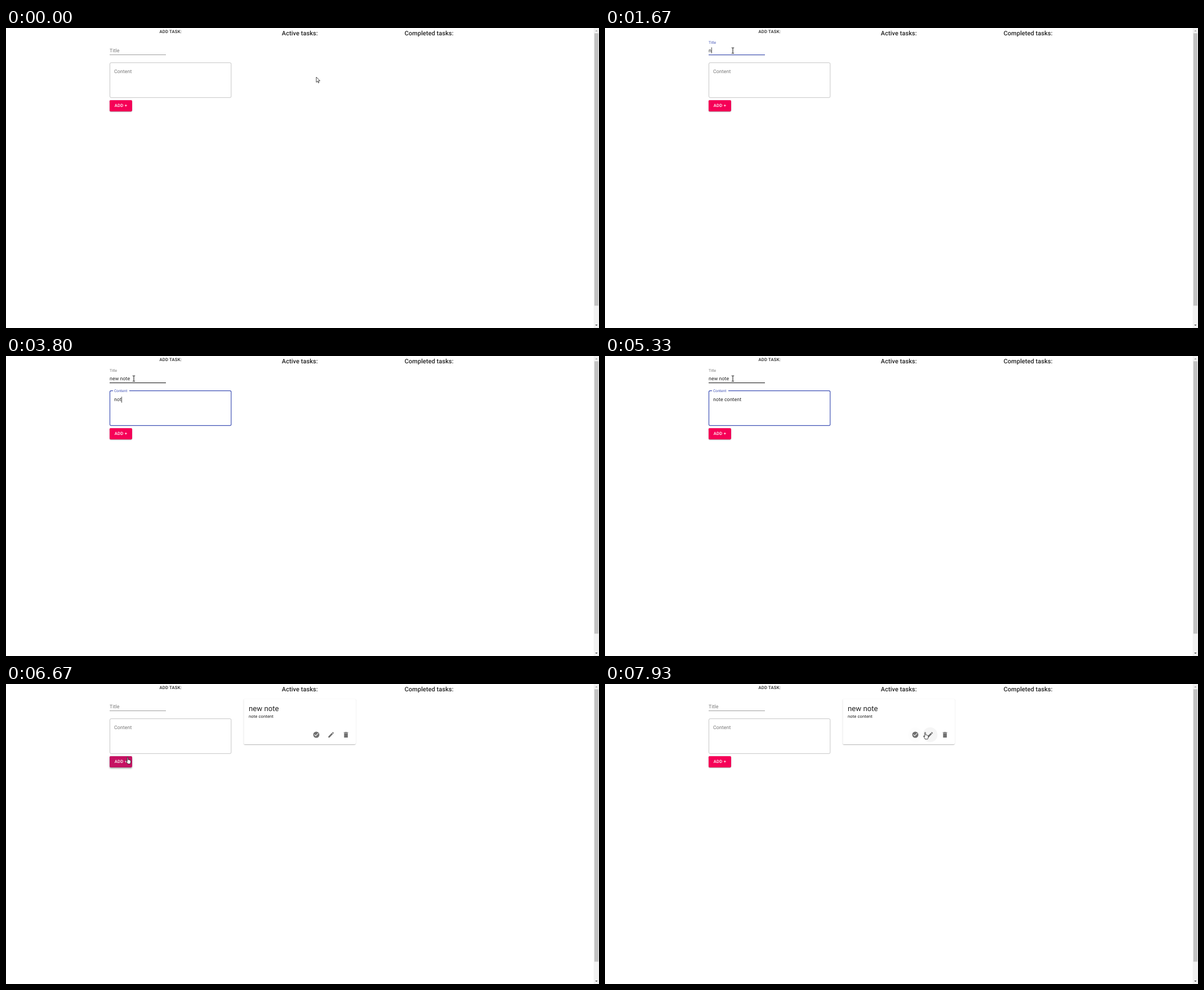
Animation, 1053 px wide and 532 px high, one loop 8000 ms. Source, as an HTML page with a canvas:

```html
<!DOCTYPE html>
<html lang="en">
<head>
<meta charset="utf-8">
<title>Task board</title>
<style>
  html, body { margin: 0; width: 100%; height: 100%; overflow: hidden; background: #fff; }
  canvas { display: block; }
</style>
</head>
<body>
<canvas id="stage" width="1053" height="532"></canvas>
<script>
const ctx = document.getElementById('stage').getContext('2d');
const LOOP = 8000;
const S = 1053 / 1920; // page zoom
const LEFT = 184;
const INK = 'rgba(0,0,0,0.87)';
const GRAY = [117, 117, 117], BLUE = [63, 81, 181], PINK = [245, 0, 87], DARK_PINK = [197, 17, 98];

// Key moments in ms
const FOCUS_TITLE = 670, FOCUS_CONTENT = 2930, PRESS = 6000, SUBMIT = 6200;

// Words are typed evenly between two times
const TITLE = [
  { word: 'new ', from: 1670, to: 1930 },
  { word: 'note', from: 2270, to: 2530 }
];
const CONTENT = [
  { word: 'note ', from: 3470, to: 4000 },
  { word: 'content', from: 4200, to: 4800 }
];

// Pointer strokes: end of the stroke, with a bend point for curved ones
const HOME = [551, 87];
const STROKES = [
  { from: 0, to: 530, end: [227, 40] },
  { from: 5530, to: 6070, bend: [115, 140], end: [211.5, 129.5] },
  { from: 6070, to: 6670, end: [216, 130] },
  { from: 6670, to: 7270, bend: [330, 172], end: [447, 158] },
  { from: 7270, to: 7930, bend: [525, 95], end: [568.5, 86] }
];

const ICON_Y = 90, ICON_R = 24 * S;
const ICONS = [
  { on: 7700, off: 7870, d: 'M2 12a10 10 0 0 0 20 0a10 10 0 0 0-20 0M10 17L5 12L6.4 10.6L10 14.2L17.6 6.6L19 8Z' },
  { on: 7800, off: LOOP, d: 'M3 17.3V21H6.7L17.8 9.9L14.1 6.2ZM15.1 5.1L17.5 2.9L21.1 6.5L18.9 8.9Z' },
  { on: LOOP, off: LOOP, d: 'M6 7H18V21H6ZM5 4H8.5L9.5 3H14.5L15.5 4H19V6H5Z' }
].map((icon, i) => ({ ...icon, x: 551 + 48 * S * i, path: new Path2D(icon.d) }));

const ARROW = new Path2D('M0 0V17L4 13.2L6.6 19L9 18L6.5 12.2H12Z');
const HAND = new Path2D('M-1.5 14V1a1.5 1.5 0 0 1 3 0V8q1.5-1.5 3 .5q1.7-1 3 1q2.5-.6 2.5 2V15q0 3-2 6.5H0Q-1 18-5.5 12.5q0-2 2.5-1.2Z');
const IBEAM = new Path2D('M-4-9H-1.5L0-8L1.5-9H4M0-8V8M-4 9H-1.5L0 8L1.5 9H4');

const clamp = v => Math.max(0, Math.min(1, v));
const easeOut = p => 1 - (1 - clamp(p)) ** 3;
const smooth = p => p * p * (3 - 2 * p);
const lerp = (a, b, p) => a + (b - a) * p;
const rgb = c => `rgb(${c.map(Math.round)})`;
const mix = (a, b, p) => rgb(a.map((v, i) => lerp(v, b[i], p)));

// Eased 0 to 1 after `on`, back to 0 after `off`
const ramp = (t, on, off, ms) => easeOut((t - on) / ms) * (1 - easeOut((t - off) / ms));

function text(str, x, y, size, color, weight = 400, spacing = 0.00938) {
  ctx.font = `${weight} ${size * S}px Roboto, sans-serif`;
  ctx.letterSpacing = `${spacing * size * S}px`;
  ctx.textRendering = 'geometricPrecision';
  ctx.fillStyle = color;
  ctx.fillText(str, x, y);
  return ctx.measureText(str).width;
}

function roundRect(x, y, w, h) {
  ctx.beginPath();
  ctx.roundRect(x, y, w, h, 4 * S);
}

function disc(x, y, r, color) {
  ctx.beginPath();
  ctx.arc(x, y, r, 0, 2 * Math.PI);
  ctx.fillStyle = color;
  ctx.fill();
}

function shadow(dy, blur, alpha) {
  ctx.shadowOffsetY = dy * S;
  ctx.shadowBlur = blur * S;
  ctx.shadowColor = `rgba(0,0,0,${alpha})`;
  ctx.fill();
}

// A contact shadow below and a soft one all round
function raised(x, y, w, h, color, level) {
  ctx.save();
  roundRect(x, y, w, h);
  ctx.fillStyle = color;
  shadow(1, 2 + 2 * level, 0.14);
  shadow(level, level, 0.26);
  ctx.restore();
}

function typed(words, t) {
  if (t >= SUBMIT) return '';
  return words.map(({ word, from, to }) => {
    const p = clamp((t - from) / (to - from));
    return t < from ? '' : word.slice(0, 1 + Math.floor(p * (word.length - 1)));
  }).join('');
}

function caret(words, t, focus, blur, x, y) {
  if (t < focus || t >= blur) return;
  let last = focus;
  for (const { from, to } of words) if (t >= from) last = Math.min(t, to);
  if (Math.floor((t - last + 5) / 533) % 2) return;
  ctx.fillStyle = INK;
  ctx.fillRect(x, y, 0.8, 10.6);
}

function label(str, x, y, smallY, shrink, tint) {
  text(str, x, lerp(y, smallY, shrink), lerp(16, 12, shrink), mix(GRAY, BLUE, tint));
}

function titleField(t) {
  const tint = ramp(t, FOCUS_TITLE, FOCUS_CONTENT, 200);
  const hover = ramp(t, 470, 5600, 200);
  label('Title', LEFT, 42.5, 28.3, ramp(t, FOCUS_TITLE, SUBMIT, 200), tint);
  const w = text(typed(TITLE, t), LEFT, 42.5, 16, INK);
  caret(TITLE, t, FOCUS_TITLE, FOCUS_CONTENT, LEFT + w, 34.3);

  ctx.fillStyle = `rgba(0,0,0,${lerp(0.42, 0.87, hover)})`;
  ctx.fillRect(LEFT, 47, 100, lerp(0.9, 1.1, hover));
  ctx.fillStyle = rgb(BLUE);
  ctx.fillRect(LEFT + 50 - 50 * tint, 47, 100 * tint, 1.1);
}

function contentField(t) {
  const shrink = ramp(t, FOCUS_CONTENT, SUBMIT, 200);
  const focused = t >= FOCUS_CONTENT && t < PRESS;
  ctx.strokeStyle = focused ? rgb(BLUE) : 'rgba(0,0,0,0.25)';
  ctx.lineWidth = focused ? 1.2 : 0.9;
  roundRect(LEFT + 0.5, 61.6, 215.3, 61.8);
  ctx.stroke();
  ctx.fillStyle = '#fff';
  ctx.fillRect(LEFT + 6, 60, 29 * shrink, 3);
  label('Content', LEFT + 8, 79.7, 64, shrink, ramp(t, FOCUS_CONTENT, PRESS, 200));
  const w = text(typed(CONTENT, t), LEFT + 8, 80.2, 16, INK);
  caret(CONTENT, t, FOCUS_CONTENT, PRESS, LEFT + 8 + w, 72.2);
}

function addButton(t) {
  const hover = ramp(t, 5930, 6730, 250);
  raised(LEFT, 128, 39.8, 19.7, mix(PINK, DARK_PINK, hover), lerp(2, 4, hover));

  const ripple = easeOut((t - PRESS) / 550);
  const glow = 0.3 * ripple * (1 - easeOut((t - SUBMIT) / 450));
  ctx.save();
  ctx.clip();
  disc(210, 130, 34 * ripple, `rgba(255,255,255,${glow})`);
  ctx.restore();
  text('ADD +', LEFT + 16 * S, 140.4, 14, '#fff', 500, 0.02857);
}

function card(t) {
  raised(422.2, 26.4, 198.8, 80.7, '#fff', 1);
  text('new note', 431, 48.3, 24, INK, 400, 0);
  text('note content', 431, 60.2, 14, INK, 400, 0.01071);
  for (const { x, on, off, path } of ICONS) {
    disc(x, ICON_Y, ICON_R, `rgba(0,0,0,${0.04 * ramp(t, on, off, 150)})`);
    ctx.save();
    ctx.translate(x - 12 * S, ICON_Y - 12 * S);
    ctx.scale(S, S);
    ctx.fillStyle = 'rgba(0,0,0,0.56)';
    ctx.fill(path, 'evenodd');
    ctx.restore();
  }
}

function triangle(y, dir, color) {
  const x = 1048.4;
  ctx.fillStyle = color;
  ctx.beginPath();
  ctx.moveTo(x - 2.2, y + dir);
  ctx.lineTo(x + 2.2, y + dir);
  ctx.lineTo(x, y - dir);
  ctx.fill();
}

function scrollbar() {
  ctx.fillStyle = '#f1f1f1';
  ctx.fillRect(1043.7, 0, 9.3, 532);
  ctx.fillStyle = '#c1c1c1';
  ctx.fillRect(1044.8, 9.4, 7.2, 483);
  triangle(5, 1.1, '#a0a0a0');
  triangle(527, -1.1, '#404040');
}

function pointerAt(t) {
  let pos = HOME;
  for (const { from, to, bend, end } of STROKES) {
    if (t < from) break;
    const p = smooth(clamp((t - from) / (to - from)));
    pos = pos.map((a, i) => {
      const c = bend ? bend[i] : (a + end[i]) / 2;
      return lerp(lerp(a, c, p), lerp(c, end[i], p), p);
    });
  }
  return pos;
}

function pointer(t) {
  const [x, y] = pointerAt(t);
  const inside = (l, top, r, b) => x >= l && x <= r && y >= top && y <= b;
  const onField = inside(LEFT, 34, 284, 48) || inside(LEFT, 62, 400, 123);
  const onButton = inside(LEFT, 128, 224, 148);
  const onIcon = t >= SUBMIT && ICONS.some(i => Math.hypot(x - i.x, y - ICON_Y) < ICON_R);
  ctx.save();
  ctx.translate(x, y);
  ctx.scale(S, S);
  ctx.lineJoin = 'round';
  ctx.lineWidth = onField ? 1.7 : 1.3;
  ctx.strokeStyle = '#000';
  ctx.fillStyle = '#fff';
  const shape = onField ? IBEAM : onButton || onIcon ? HAND : ARROW;
  if (!onField) ctx.fill(shape);
  ctx.stroke(shape);
  ctx.restore();
}

function draw(t) {
  ctx.fillStyle = '#fff';
  ctx.fillRect(0, 0, 1053, 532);
  text('ADD TASK:', 272.4, 8.9, 14, INK, 500, 0.02857);
  text('Active tasks:', 489.8, 12.5, 20, INK, 500, 0.0075);
  text('Completed tasks:', 707.8, 12.5, 20, INK, 500, 0.0075);
  titleField(t);
  contentField(t);
  addButton(t);
  if (t >= SUBMIT) card(t);
  scrollbar();
  pointer(t);
}

// The screen updates 15 times per second, on a 10 ms grid
function tick() {
  const step = Math.floor((performance.now() % LOOP + 5) * 15 / 1000);
  draw(Math.round(step * 20 / 3) * 10 % LOOP);
  requestAnimationFrame(tick);
}
tick();
</script>
</body>
</html>
```
